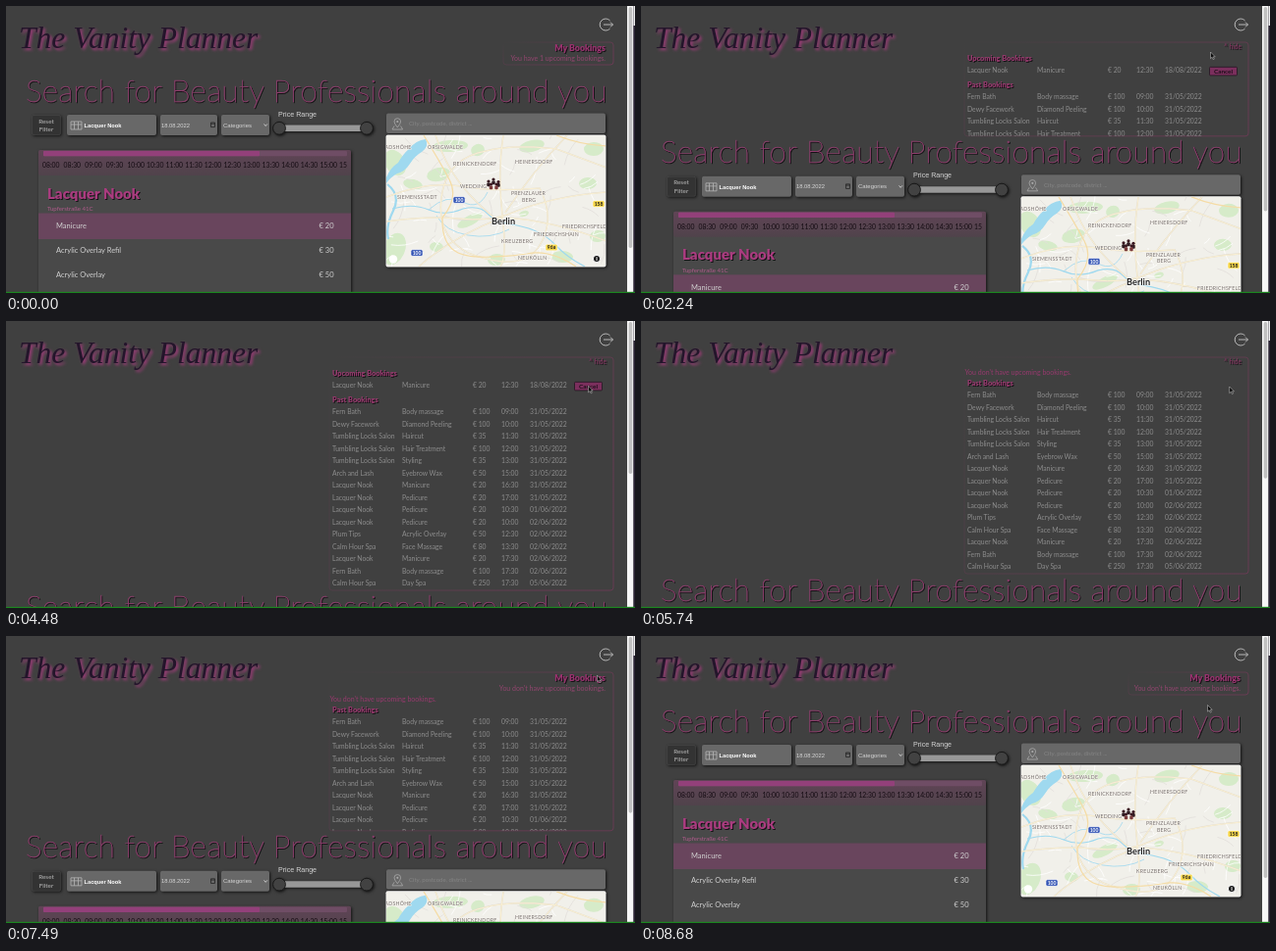
An HTML page that plays this animation: 640 by 293 pixels, repeating every 8820 ms.

```html
<!DOCTYPE html>
<html lang="en">
<head>
<meta charset="utf-8">
<title>Booking page</title>
<style>
  html, body { margin: 0; width: 100%; height: 100%; overflow: hidden; background: #404040; }
  svg { display: block; width: 100vw; height: 100vh; }
  text { font-family: Lato, sans-serif; white-space: pre; }
  .arial { font-family: "Liberation Sans", sans-serif; }
  .brand { font-family: "Liberation Serif", serif; font-style: italic;
    filter: drop-shadow(2px 2px 1.5px #a03a7a); }
  .dark { filter: drop-shadow(1px 1px .7px #151015); }
  .box { filter: drop-shadow(1px 1.5px 1.5px #111); }
</style>
</head>
<body>
<svg id="stage" viewBox="0 0 640 293" preserveAspectRatio="none"></svg>
<script>
const LOOP = 8820, OPEN = 2170, CANCEL = 4970, CLOSE = 7420, SLIDE = 380;
const PINK = '#96396d', FIELD = '#686868', WATER = '#9fd9ef';
const salon = 'Lacquer Nook', bath = 'Fern Bath', hair = 'Tumbling Locks Salon', calm = 'Calm Hour Spa';

const txt = (x, y, s, size, fill, more = '') =>
  `<text x="${x}" y="${y}" font-size="${size}" fill="${fill}" ${more}>${s}</text>`;
const rect = (x, y, w, h, fill, more = '') =>
  `<rect x="${x}" y="${y}" width="${w}" height="${h}" fill="${fill}" ${more}/>`;
const circ = (x, y, r, fill, more = '') =>
  `<circle cx="${x}" cy="${y}" r="${r}" fill="${fill}" ${more}/>`;
const line = (d, stroke, w = 1, more = '') =>
  `<path d="${d}" fill="none" stroke="${stroke}" stroke-width="${w}" ${more}/>`;
const blob = (d, fill) => `<path d="${d}" fill="${fill}"/>`;
const group = (id, s, more = '') => `<g id="${id}" ${more}>${s}</g>`;

let seed = 11;
const rnd = () => (seed = seed * 16807 % 2147483647) / 2147483647;

// Bookings panel
const bold = 'font-weight="900" class="dark"';
function booking(y, name, job, price, time, date) {
  return [[332, name], [403, job], [475, '€ ' + price], [504, time], [533, date]]
    .map(([x, s]) => txt(x, y, s, 6.8, '#8c8c8c')).join('');
}
const past = [
  [bath, 'Body massage', 100, '09:00', '31/05'],
  ['Dewy Facework', 'Diamond Peeling', 100, '10:00', '31/05'],
  [hair, 'Haircut', 35, '11:30', '31/05'],
  [hair, 'Hair Treatment', 100, '12:00', '31/05'],
  [hair, 'Styling', 35, '13:00', '31/05'],
  ['Arch and Lash', 'Eyebrow Wax', 50, '15:00', '31/05'],
  [salon, 'Manicure', 20, '16:30', '31/05'],
  [salon, 'Pedicure', 20, '17:00', '31/05'],
  [salon, 'Pedicure', 20, '10:30', '01/06'],
  [salon, 'Pedicure', 20, '10:00', '02/06'],
  ['Plum Tips', 'Acrylic Overlay', 50, '12:30', '02/06'],
  [calm, 'Face Massage', 80, '13:30', '02/06'],
  [salon, 'Manicure', 20, '17:30', '02/06'],
  [bath, 'Body massage', 100, '17:30', '02/06'],
  [calm, 'Day Spa', 250, '17:30', '05/06']
];
const upcoming = txt(332, 56, 'Upcoming Bookings', 7.3, PINK, bold) +
  booking(68.3, salon, 'Manicure', 20, '12:30', '18/08/2022') +
  rect(578.5, 62.3, 28, 8.6, '#7b2f5d', 'rx="1" stroke="#211620" stroke-width=".8"') +
  txt(592.5, 69, 'Cancel', 6.4, '#1c0f19', 'text-anchor="middle" font-weight="700"');
const history = txt(332, 82.8, 'Past Bookings', 7.3, PINK, bold) +
  past.map((r, i) => booking(95.3 + 12.5 * i, r[0], r[1], r[2], r[3], r[4] + '/2022')).join('');

// City map
function cityMap() {
  let s = rect(387, 132, 224, 135, '#f1f0ea');
  const parks = [[396, 160, 10, 14], [452, 143, 18, 6], [440, 172, 12, 7], [472, 219, 14, 5], [395, 248, 11, 17],
    [499, 259, 9, 6], [566, 256, 11, 6], [598, 146, 10, 7], [592, 181, 9, 6], [535, 143, 13, 6],
    [527, 212, 5, 3], [414, 182, 10, 5], [480, 147, 7, 6], [602, 235, 8, 6], [438, 246, 7, 5]];
  for (const [x, y, a, b] of parks)
    s += `<ellipse cx="${x}" cy="${y}" rx="${a}" ry="${b}" fill="#d6ebc9" transform="rotate(${rnd() * 60 - 30} ${x} ${y})"/>`;
  for (let i = 0; i < 90; i++) {
    const x = 390 + rnd() * 220, y = 134 + rnd() * 130, a = rnd() * 6.3, l = 8 + rnd() * 22;
    s += line(`M${x} ${y}q${l / 2 * Math.cos(a + .3)} ${l / 2 * Math.sin(a + .3)} ${l * Math.cos(a)} ${l * Math.sin(a)}`, i % 3 ? '#fff' : '#e2dfdb', .8);
  }
  s += blob('M427 136 Q431 143 423 149 Q416 153 411 161 Q406 169 398 171 Q391 175 387 181 V175 Q391 165 399 160 Q404 151 410 146 Q417 137 427 136Z', WATER);
  s += line('M388 182 Q402 193 394 209 T389 238', WATER, 2.2);
  s += line('M393 207 Q414 201 430 208 T465 207 Q482 203 490 212 T520 224 Q545 229 558 243 T589 266', WATER, 1.2);
  s += line('M430 208 Q449 191 465 200 T490 190 M512 228 Q493 238 470 234 T438 214', WATER, .8);
  const main = 'M387 220 Q430 214 460 217 T510 213 Q555 194 611 190 M437 132 Q446 160 462 181 T503 221 ' +
    'M506 132 Q500 170 505 213 T503 266 M571 132 Q535 170 508 211 M611 240 Q556 219 508 216 M420 266 Q455 235 505 216 ' +
    'M387 195 Q430 178 463 184 T543 186 Q560 219 542 246 T470 252 Q438 235 443 196 Q447 160 480 150 T560 146 L611 165';
  s += line(main, '#e3dccf', 1.6) + line(main, '#faf0d2', 1);
  s += line('M425 132 Q441 158 451 177 T444 216 Q443 244 460 252 T530 253 Q553 248 580 266 M560 132 Q585 142 611 143', '#f5dca6', 1.2);
  const places = [[385.5, 146, 'ADSHÖHE'], [429, 146, 'ORSIGWALDE'], [455, 163, 'REINICKENDORF'], [518, 160.5, 'HEINERSDORF'],
    [462, 186, 'WEDDING'], [514, 193, 'PRENZLAUER'], [525, 199.5, 'BERG'], [398, 197, 'SIEMENSSTADT'],
    [566, 227, 'FRIEDRICHSFELDE'], [537, 235, 'FRIEDRICHSHAIN'], [504, 242, 'KREUZBERG'], [521, 259, 'NEUKÖLLN']];
  for (const [x, y, n] of places)
    s += txt(x, y, n, 5.2, '#77716e', 'letter-spacing=".25" stroke="#f6f3ee" stroke-width="1" paint-order="stroke"');
  s += txt(494, 222.5, 'Berlin', 9.2, '#222', 'font-weight="700" stroke="#fff" stroke-width="1.2" paint-order="stroke"');
  const shields = [[461, 198, '100', '#3455b5', '#fff'], [418, 252, '100', '#3455b5', '#fff'],
    [603, 202, '158', '#f7d648', '#222'], [555, 246.5, '96a', '#f7d648', '#222']];
  for (const [x, y, n, bg, fg] of shields)
    s += rect(x - 6, y - 3.3, 12, 6.6, bg, 'rx="1.5" stroke="#fff" stroke-width=".6"') +
      txt(x, y + 1.9, n, 5, fg, 'text-anchor="middle" font-weight="700"');
  // marker: a small crowd
  [[491, 179], [496, 177], [501, 179.5], [493.5, 182], [499, 182]].forEach(([x, y], i) => {
    s += circ(x, y, 1.6, '#3a1720') + rect(x - 1.7, y + 1.5, 3.4, 3.8, i > 2 ? '#7a3a3a' : '#2e1a20', 'rx="1"');
  });
  s += circ(394, 258.5, 4.2, '#fff') + circ(601, 258, 3.6, '#111', 'stroke="#fff" stroke-width="1"') +
    txt(601, 260.2, 'i', 6, '#fff', 'text-anchor="middle" font-weight="900"');
  return s;
}

// Filters, salon card and map
function page() {
  let s = txt(20, 97.6, 'Search for Beauty Professionals around you', 31.5, '#8f3d6d',
    'font-weight="200" letter-spacing=".33" stroke="#8f3d6d" stroke-width=".45" class="dark"');
  let f = rect(26.5, 111.5, 29, 20, '#333', 'rx="1.5" stroke="#505050" stroke-width=".5"');
  for (const [x, w] of [[62, 91], [157, 58], [219, 49]]) f += rect(x, 111, w, 21, FIELD, 'rx="2"');
  f += rect(387, 109.5, 223, 20.5, FIELD, 'rx="2"');
  s += `<g class="box">${f}</g>`;
  s += txt(41, 119.5, 'Reset', 6.4, '#bbb', 'text-anchor="middle"') + txt(41, 128, 'Filter', 6.4, '#bbb', 'text-anchor="middle"');
  s += line('M66 118h11M66 118v8h11v-8M66 121h11M69.5 118v8M73.5 118v8', '#b5b5b5', .8);
  s += txt(79.5, 123.8, salon, 5.7, '#fff', 'font-weight="700" class="arial"');
  s += txt(158, 123.6, '18.08.2022', 5.8, '#d8d8d8', 'class="arial"') + line('M208.5 119h4v4.6h-4zM208.5 120.2h4', '#222', .8);
  s += txt(221, 123.6, 'Categories', 6, '#d5d5d5', 'class="arial"') + line('M262.5 120.5l1.7 2 1.7-2', '#ddd', .8);
  s += txt(277, 112.6, 'Price Range', 7.1, '#d4d4d4', 'class="arial"');
  s += `<g class="box">${rect(277, 121.5, 90, 6.5, '#989898', 'rx="3"')}${[278, 367].map(x =>
    circ(x, 124.8, 6.4, '#424242', 'stroke="#191919" stroke-width="1"')).join('')}</g>`;
  s += line('M398.3 124q-3.3-4.2-3.3-6a3.3 3.3 0 0 1 6.6 0q0 1.8-3.3 6zM395 122.5l-2 3.5h10.6l-2-3.5', '#a9a9a9', .8) + circ(398.3, 118, 1.1, '#a9a9a9');
  s += txt(410, 122.3, 'City, postcode, district ...', 6, '#858585');

  s += rect(33, 147, 318, 220, '#494949', 'rx="2" class="box"') + rect(33, 147, 318, 26, 'url(#head)', 'rx="2"');
  s += rect(38, 148, 309, 5.2, '#6f4d65', 'rx="1"') + rect(38, 148, 220, 5.2, '#93407a', 'rx="1"');
  let hours = '';
  for (let i = 0; i < 16; i++) {
    const x = i < 5 ? 37 + 21.6 * i : 123.4 + 19.6 * (i - 4);
    hours += txt(x, 165.3, String(8 + (i >> 1)).padStart(2, '0') + (i % 2 ? ':30' : ':00'), 6.8, '#150c13');
  }
  s += `<g clip-path="url(#hours)">${hours}</g>`;
  s += txt(42, 196.5, salon, 15, '#ab3c80', bold) + txt(42, 209.3, 'Tupferstraße 41C', 6.1, '#b05a8b');
  s += rect(33, 211.5, 318, 26.5, '#69455d');
  [['Manicure', 20], ['Acrylic Overlay Refil', 30], ['Acrylic Overlay', 50]].forEach(([n, p], i) => {
    const y = 227 + 25 * i;
    s += txt(51, y, n, 7.5, '#d0d0d0') + txt(333.5, y, '€ ' + p, 7.5, '#d0d0d0', 'text-anchor="end"');
  });
  s += rect(386.5, 131.5, 224, 135, '#eee', 'rx="2" class="box"') + `<g clip-path="url(#map)">${cityMap()}</g>`;
  return s;
}

const stage = document.getElementById('stage');
stage.innerHTML = `<defs>
  <linearGradient id="head" x1="0" y1="0" x2="0" y2="1"><stop stop-color="#604456"/><stop offset="1" stop-color="#50434b"/></linearGradient>
  <linearGradient id="edge" x1="0" y1="0" x2="1" y2=".5"><stop stop-color="#82375f" stop-opacity="0"/><stop offset="1" stop-color="#82375f" stop-opacity=".65"/></linearGradient>
  <clipPath id="hours">${rect(33, 150, 314, 22, '#000')}</clipPath>
  <clipPath id="map">${rect(387, 132, 223, 134, '#000', 'rx="2"')}</clipPath>
  <clipPath id="panel"><rect id="mask" x="320" y="37" width="300" height="10"/></clipPath></defs>` +
  rect(0, 0, 640, 293, '#404040') +
  group('page', page()) +
  txt(13, 43, 'The Vanity Planner', 31.5, '#24152b', 'class="brand"') +
  line('M614.5 14.8a6 6 0 1 0 0 8.4M608 19h9.5M615 16.5l2.5 2.5-2.5 2.5', '#b8b8b8', 1) +
  '<rect id="frame" y="37" rx="3" fill="none" stroke="url(#edge)" stroke-width=".9"/>' +
  `<g clip-path="url(#panel)">${group('list', group('next', upcoming) +
    group('none', txt(329.5, 55.3, "You don't have upcoming bookings.", 7, PINK)) + group('past', history))}</g>` +
  group('title', txt(610, 45.8, 'My Bookings', 8.8, '#9a326f', 'text-anchor="end" ' + bold) +
    '<text id="note" x="610" y="55.5" font-size="7" fill="#91456e" text-anchor="end"></text>') +
  group('hide', txt(611, 44.2, '^ hide', 6.6, '#8a3563', 'text-anchor="end" class="dark"')) +
  rect(632, 0, 6.5, 293, '#f6f6f6') + '<rect id="thumb" x="633.6" y="1" width="3.6" rx="1.8" fill="#c0c0c0"/>' +
  rect(638.5, 0, 1.5, 293, '#2c2536') + rect(638.5, 0, 1.5, 20, '#eee') + rect(0, 291.8, 640, 1.2, '#1b861f') +
  group('mouse', group('ring', circ(2.5, 3.5, 7.6, '#222', 'fill-opacity=".5" stroke="#111" stroke-width="1.4"') +
    circ(2.5, 3.5, 6.4, 'none', 'stroke="#e2e2e2" stroke-width="1.1"')) +
    '<path d="M0 0V6.6L1.6 5.2L2.7 7.6L3.8 7.1L2.7 4.8H4.7Z" fill="#0b0b0b" stroke="#d0d0d0" stroke-width=".5"/>');

const el = {};
stage.querySelectorAll('[id]').forEach(n => el[n.id] = n);
const set = (n, attrs) => { for (const k in attrs) el[n].setAttribute(k, attrs[k]); };
const show = (n, on) => set(n, { display: on ? 'inline' : 'none' });
const move = (n, x, y) => set(n, { transform: `translate(${x} ${y})` });
const clamp = v => Math.max(0, Math.min(1, v));
const slide = (t, from) => 1 - (1 - clamp((t - from) / SLIDE)) ** 2;
const within = (t, a, b) => t >= a && t < b;

const trail = [[300, 645, 140], [1100, 601, 70], [1650, 579.5, 47], [2400, 579.5, 47], [2750, 578, 51], [3500, 578, 51],
  [4250, 592, 66], [4990, 594, 67], [5600, 598.7, 67], [6200, 598.7, 67], [6750, 601.5, 40.5], [7800, 601.5, 40],
  [8500, 576.5, 70.5], [LOOP, 576.5, 70.5]];
function pointer(t) {
  const i = Math.max(1, trail.findIndex(k => k[0] > t));
  const [t0, x0, y0] = trail[i - 1], [t1, x1, y1] = trail[i];
  const p = clamp((t - t0) / (t1 - t0)), e = p * p * (3 - 2 * p);
  return [x0 + (x1 - x0) * e, y0 + (y1 - y0) * e];
}

function draw(t) {
  const open = within(t, OPEN, CLOSE), closing = within(t, CLOSE, CLOSE + SLIDE), gone = t >= CANCEL;
  let bottom = 60;
  if (open) bottom = gone ? 258 : 60 + 215 * slide(t, OPEN);
  else if (closing) bottom = 270 - 210 * slide(t, CLOSE);
  const shift = Math.max(0, bottom - 70), wide = open || closing;
  const left = wide ? 329 : gone ? 496 : 506;

  move('page', 0, shift);
  set('frame', { x: left, width: 618 - left, height: bottom - 37 });
  set('mask', { height: bottom - 37 });
  set('thumb', { height: 293 * 293 / (349 + shift) });
  show('list', wide);
  move('list', 0, closing ? 12 : 0);
  move('past', 0, gone ? -17 : 0);
  show('next', !gone);
  show('none', gone);
  show('title', !open);
  show('hide', open);
  el.note.textContent = gone ? "You don't have upcoming bookings." : 'You have 1 upcoming bookings.';

  move('mouse', ...pointer(t));
  show('mouse', t >= 300);
  show('ring', within(t, 2030, 2200) || within(t, 4830, 4990) || within(t, 7140, 7400));
}

const start = performance.now();
function tick() {
  draw((performance.now() - start) % LOOP);
  requestAnimationFrame(tick);
}
tick();
</script>
</body>
</html>
```
